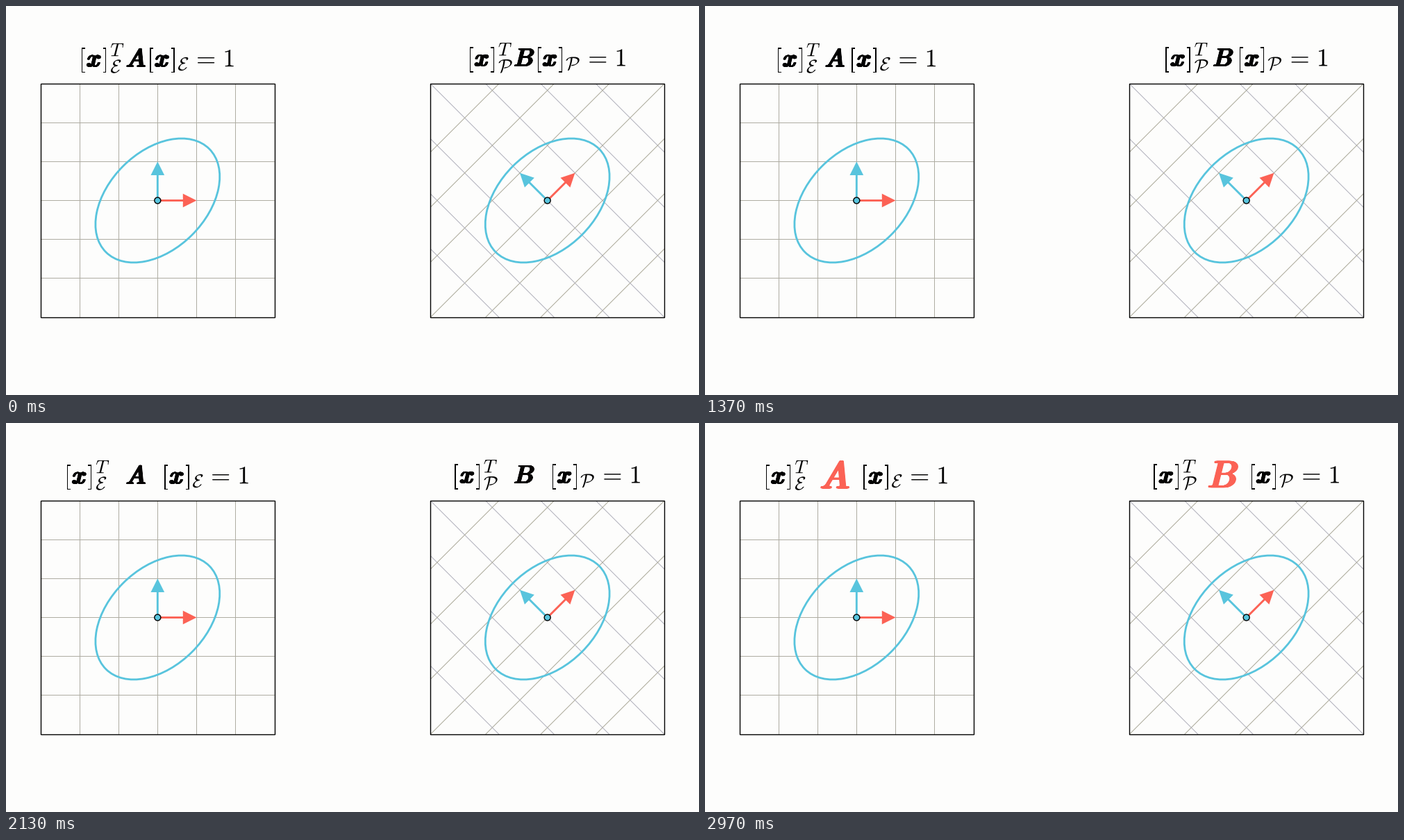
Write a matplotlib script that moves like this. It is 998 px wide and 561 px high and loops after 3010 ms.

```python
import numpy as np
import matplotlib as mpl
import matplotlib.pyplot as plt
from matplotlib.animation import FuncAnimation
from matplotlib.patches import Circle, Ellipse, PathPatch, Polygon, Rectangle
from matplotlib.path import Path
from matplotlib.textpath import TextPath
from matplotlib.transforms import Affine2D

mpl.rcParams["mathtext.fontset"] = "cm"

W, H, DPI = 998, 561, 100
PT = 72 / DPI              # points per pixel
UNIT = W * 9 / 128         # scene unit in pixels
CELL = 0.8 * UNIT          # grid spacing
HALF = 3 * CELL            # half the side of a panel
CY = H / 2
EM = 36.3
SPREAD = 0.3 * UNIT
BG, BLUE, RED = "#fdfdfc", "#58c4dd", "#fc6255"
GRAY, WARM, COOL = "#aeaca2", "#aba999", "#b0b0bb"

LOOP, STEP, FPS = 3010, 10, 30

fig = plt.figure(figsize=(W / DPI, H / DPI), dpi=DPI, facecolor=BG)
ax = fig.add_axes([0, 0, 1, 1])
ax.set_xlim(0, W)
ax.set_ylim(H, 0)
ax.axis("off")


def smooth(t):
    """Sigmoid ease from 0 to 1."""
    sig = lambda v: 1 / (1 + np.exp(-v))
    t = min(max(t, 0), 1)
    low = sig(-5)
    return (sig(10 * (t - 0.5)) - low) / (1 - 2 * low)


def line(xs, ys, color, width, z):
    ax.plot(xs, ys, color=color, lw=width * PT, zorder=z, snap=False,
            solid_capstyle="butt")


def crisp(v):
    return np.floor(v + 0.22) + 0.5


def square_grid(cx):
    for k in range(-2, 3):
        x, y = crisp(cx + k * CELL), crisp(CY + k * CELL)
        line([x, x], [CY - HALF, CY + HALF], GRAY, 1, 1)
        line([cx - HALF, cx + HALF], [y, y], GRAY, 1, 1)


def diagonal_grid(cx):
    for k in range(-3, 4):
        c = k * CELL * np.sqrt(2)
        u = np.array([max(-HALF, -HALF - c), min(HALF, HALF - c)])
        line(cx + u, CY + u + c, COOL, 1, 1)
        line(cx + u, CY - u - c, WARM, 1, 1)


def arrow(cx, angle, color):
    d = np.array([np.cos(angle), -np.sin(angle)])
    n = np.array([-d[1], d[0]])
    start = np.array([cx, CY])
    tip = 0.35 * CELL
    end = start + CELL * d
    base = end - tip * d
    line(*zip(start, base + d), color, 2.9, 4)
    ax.add_patch(Polygon([end, base + n * tip / 2, base - n * tip / 2],
                         fc=color, lw=0, zorder=4))


def panel(cx, angle):
    x0, x1 = np.round([cx - HALF, cx + HALF]) + 0.5
    y0, y1 = np.round([CY - HALF, CY + HALF]) + 0.5
    ax.add_patch(Rectangle((x0, y0), x1 - x0, y1 - y0, fill=False, ec="black",
                           lw=1.4 * PT, zorder=2, snap=False))
    ax.add_patch(Ellipse((cx, CY), 3 * UNIT, 2 * UNIT, angle=-45, fill=False,
                         ec=BLUE, lw=2.8 * PT, zorder=3))
    arrow(cx, angle, RED)
    arrow(cx, angle + np.pi / 2, BLUE)
    ax.add_patch(Circle((cx, CY), 0.08 * CELL, fc=BLUE, ec="black",
                        lw=1.4 * PT, zorder=5))


def glyph(tex, left, base, size=1.0, bold=False):
    """Place a glyph by the left edge of its ink and its baseline."""
    path = TextPath((0, 0), f"${tex}$", size=EM * size)
    v = path.vertices
    ink = v[path.codes != Path.CLOSEPOLY][:, 0].min()
    v = (v - [ink, 0]) * [1, -1] + [left, base]
    path = Path(v, path.codes)
    if bold:
        # Thicken stems sideways with overlapping copies.
        path = Path.make_compound_path(
            *[Path(v + [dx, 0], path.codes)
              for dx in np.linspace(0.01, 0.07, 5) * EM])
    return ax.add_patch(PathPatch(path, fc="black", ec="black", zorder=6,
                                  lw=0.02 * EM * PT if bold else 0))


class Formula:
    def __init__(self, cx, base, matrix, basis, basis_width):
        # (glyph, side, advance, bearing, size, rise, bold), lengths in em
        basis = rf"\mathcal{{{basis}}}"
        vector = [("[", 0.278, 0.118, 1, 0, False),
                  ("x", 0.659, 0.03, 1, 0, True),
                  ("]", 0.278, 0.022, 1, 0, False)]
        parts = [(-1, *p) for p in vector]
        parts += [(-1, "T", 0, 0.06, 0.74, 0.413, False),
                  (-1, basis, 0.618, 0.06, 0.74, -0.247, False),
                  (0, matrix, 0.869, 0.055, 1, 0, True)]
        parts += [(1, *p) for p in vector]
        parts += [(1, basis, basis_width + 0.328, 0.03, 0.74, -0.15, False),
                  (1, "=", 1.056, 0.056, 1, 0, False),
                  (1, "1", 0.5, 0.087, 1, 0, False)]
        total = sum(p[2] for p in parts)
        pen = cx - EM * (total + 0.118 - 0.079) / 2
        self.sides = []
        for side, tex, adv, bearing, size, rise, bold in parts:
            patch = glyph(tex, pen + bearing * EM, base - rise * EM, size, bold)
            pen += adv * EM
            if side:
                self.sides.append((side, patch))
            else:
                self.matrix = patch
        self.mid = self.matrix.get_path().get_extents()
        self.mid = (self.mid.x0 + self.mid.x1) / 2, (self.mid.y0 + self.mid.y1) / 2

    def pose(self, spread, grow):
        for side, patch in self.sides:
            move = Affine2D().translate(side * spread * SPREAD, 0)
            patch.set_transform(move + ax.transData)
        x, y = self.mid
        scale = 1 + 0.5 * grow
        zoom = Affine2D().translate(-x, -y).scale(scale).translate(x, y)
        self.matrix.set_transform(zoom + ax.transData)
        self.matrix.set_color(np.array(mpl.colors.to_rgb(RED)) * grow)
        self.matrix.set_linewidth(0.02 * EM * PT * scale)


LEFT, RIGHT = W / 2 - 4 * UNIT, W / 2 + 4 * UNIT
square_grid(LEFT)
diagonal_grid(RIGHT)
panel(LEFT, 0)
panel(RIGHT, np.pi / 4)
formulas = [Formula(LEFT, 87.4, "A", "E", 0.42),
            Formula(RIGHT, 86.6, "B", "P", 0.575)]


def update(i):
    # Motion advances in whole ticks of the frame rate.
    tick = min((i * STEP + 5) * FPS // 1000, 89)
    t = tick / FPS
    for f in formulas:
        f.pose(smooth(t - 1), smooth(t - 2))
    return []


anim = FuncAnimation(fig, update, frames=LOOP // STEP, interval=STEP,
                     init_func=lambda: update(0), repeat=True, repeat_delay=0)
plt.show()
```
